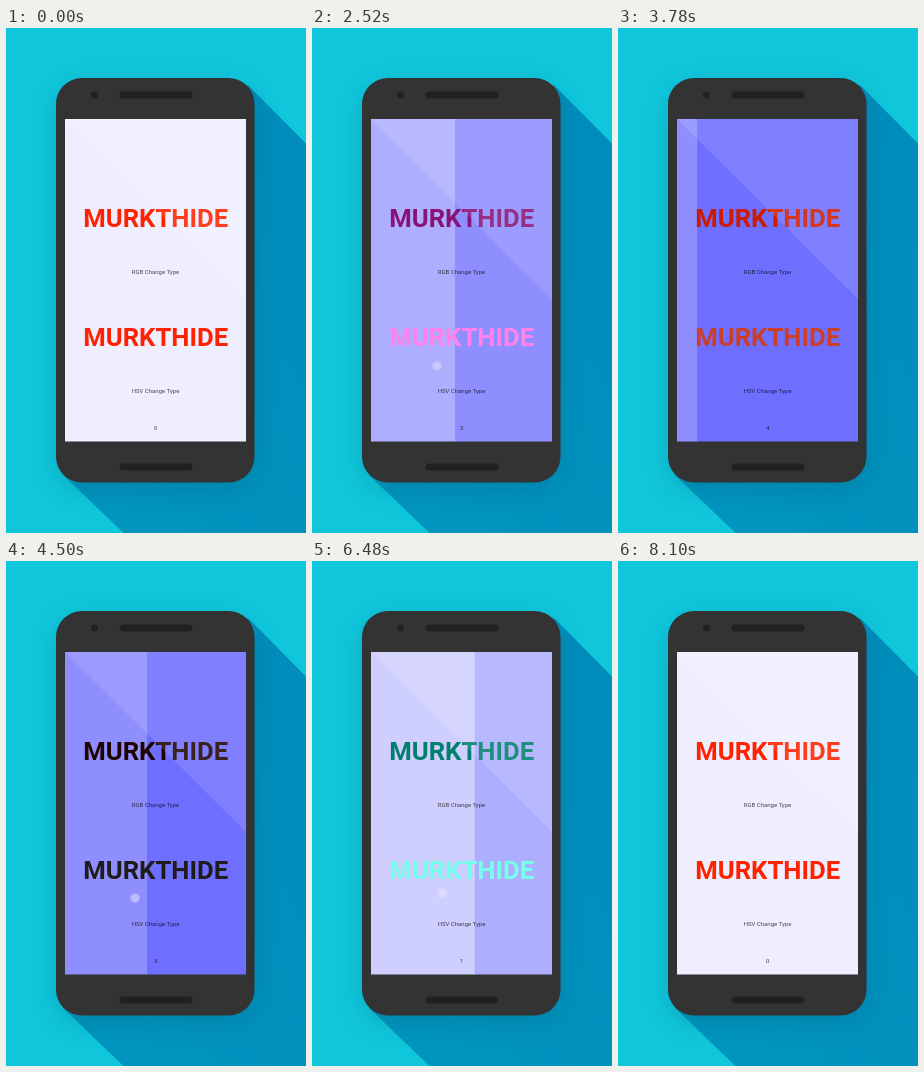
Animation of 300x505 px, one loop 8190 ms. Source, as an HTML page:

```html
<!DOCTYPE html>
<html lang="en">
<head>
<meta charset="utf-8">
<title>Text colour paging</title>
<style>
html, body { margin: 0; width: 100%; height: 100%; overflow: hidden; background: #10c6db; }
svg { display: block; width: 300px; height: 505px; }
text { font-family: Roboto, sans-serif; text-anchor: middle; }
.title { font-size: 25.7px; font-weight: 700; }
.note { font-size: 6px; fill: #000; fill-opacity: .7; }
</style>
</head>
<body>
<svg viewBox="0 0 300 505">
  <defs>
    <linearGradient id="shade" x1="0" y1="1" x2="1" y2="0">
      <stop offset="0" stop-color="#0096bf"/>
      <stop offset="1" stop-color="#008cbb"/>
    </linearGradient>
    <filter id="blur" x="-30%" y="-20%" width="160%" height="140%"><feGaussianBlur stdDeviation="13"/></filter>
    <clipPath id="screen"><rect x="59" y="91" width="181" height="322.5"/></clipPath>
  </defs>
  <rect width="300" height="505" fill="#10c6db"/>
  <path d="M242 57L300 115.5V505H117.5L57 447Z" fill="url(#shade)"/>
  <rect x="50" y="58" width="198.5" height="404" rx="27" fill="#00506c" opacity=".24" filter="url(#blur)"/>
  <rect x="50" y="50" width="198.5" height="404.5" rx="26" fill="#333"/>
  <g fill="#212121">
    <circle cx="88.5" cy="67" r="3.5"/>
    <rect x="113.5" y="63.5" width="73" height="7" rx="3.5"/>
    <rect x="113.5" y="435.5" width="73" height="7" rx="3.5"/>
  </g>
  <g clip-path="url(#screen)">
    <g id="pages"></g>
    <text id="rgb" class="title" x="149.7" y="199">MURKTHIDE</text>
    <text class="note" x="149.5" y="245.7">RGB Change Type</text>
    <text id="hsv" class="title" x="149.7" y="318">MURKTHIDE</text>
    <text class="note" x="149.5" y="364.7">HSV Change Type</text>
    <text id="count" class="note" x="149.7" y="402">0</text>
    <g id="touch" fill="#fff">
      <circle r="5" opacity=".35"/>
      <circle r="3.6" opacity=".3"/>
    </g>
    <path d="M59 91L240 271V91Z" fill="#fff" opacity=".12"/>
  </g>
</svg>
<script>
const $ = id => document.getElementById(id);
const LOOP = 8190, STEP = 30, DRAG = 280, PULL = .25, WIDTH = 181;

// Each swipe: release time, start page, direction, finger x and y at release, settle time
const swipes = [
  [330, 0, 1, 128, 336, 600], [1378, 1, 1, 129.5, 336, 600],
  [2465, 2, 1, 125, 338, 600], [3660, 3, 1, 128, 337, 380],
  [4463, 4, -1, 129, 337, 600], [5440, 3, -1, 128, 335, 600],
  [6416, 2, -1, 130, 332, 600], [7400, 1, -1, 129, 335, 600]
];
const colors = [[255, 34, 0], [0, 222, 0], [0, 0, 255], [255, 34, 0], [0, 0, 0]];
const hues = [8, 120, 240, 368, 368];

const clamp = v => Math.max(0, Math.min(1, v));
const mix = (a, b, k) => a + (b - a) * k;

for (let i = 0; i < 5; i++) {
  const c = 238 - 32 * i;
  $('pages').innerHTML += `<rect x="${59 + i * WIDTH}" y="91" width="${WIDTH + .5}" height="323" fill="rgb(${c},${c},255)"/>`;
}

function position(t) {
  let pos = 0;
  for (const [release, from, dir, , , settle] of swipes) {
    if (t < release - DRAG) break;
    const pull = PULL * clamp((t - release) / DRAG + 1);
    const ease = 1 - (1 - clamp((t - release) / settle)) ** 5;
    pos = from + dir * mix(pull, 1, ease);
  }
  return pos;
}

function hsv(h, s, v) {
  const part = n => {
    const k = (n + h / 60) % 6;
    return 255 * v * (1 - s * clamp(Math.min(k, 4 - k)));
  };
  return [part(5), part(3), part(1)];
}

const css = c => `rgb(${c.map(Math.round)})`;

function paintTitles(pos) {
  const i = Math.min(3, Math.floor(pos)), k = pos - i;
  $('rgb').setAttribute('fill', css(colors[i].map((c, n) => mix(c, colors[i + 1][n], k))));
  const sat = i === 3 ? 1 - k : 1 - 1.1 * Math.min(k, 1 - k);
  $('hsv').setAttribute('fill', css(hsv(mix(hues[i], hues[i + 1], k), sat, i === 3 ? 1 - k : 1)));
}

function paintTouch(t) {
  const swipe = swipes.find(([release]) => t >= release - DRAG && t < release + 115);
  $('touch').setAttribute('opacity', swipe ? clamp((swipe[0] + 115 - t) / 100) : 0);
  if (!swipe) return;
  const [release, , dir, x, y] = swipe;
  const left = 1 - clamp((t - release) / DRAG + 1);
  $('touch').setAttribute('transform', `translate(${x + dir * left * PULL * WIDTH},${y})`);
}

function draw(now) {
  const t = Math.min(8100, Math.floor(now % LOOP / STEP) * STEP);
  $('pages').setAttribute('transform', `translate(${-position(t) * WIDTH},0)`);
  // The titles trail the pages around the last page
  paintTitles(position(t > 3300 && t < 5160 ? t - 180 : t));
  paintTouch(t);
  $('count').textContent = swipes.reduce((n, s) => t >= s[0] ? n + s[2] : n, 0);
}

let start;
function tick(now) {
  start ??= now;
  draw(now - start);
  requestAnimationFrame(tick);
}
draw(0);
requestAnimationFrame(tick);
</script>
</body>
</html>
```
